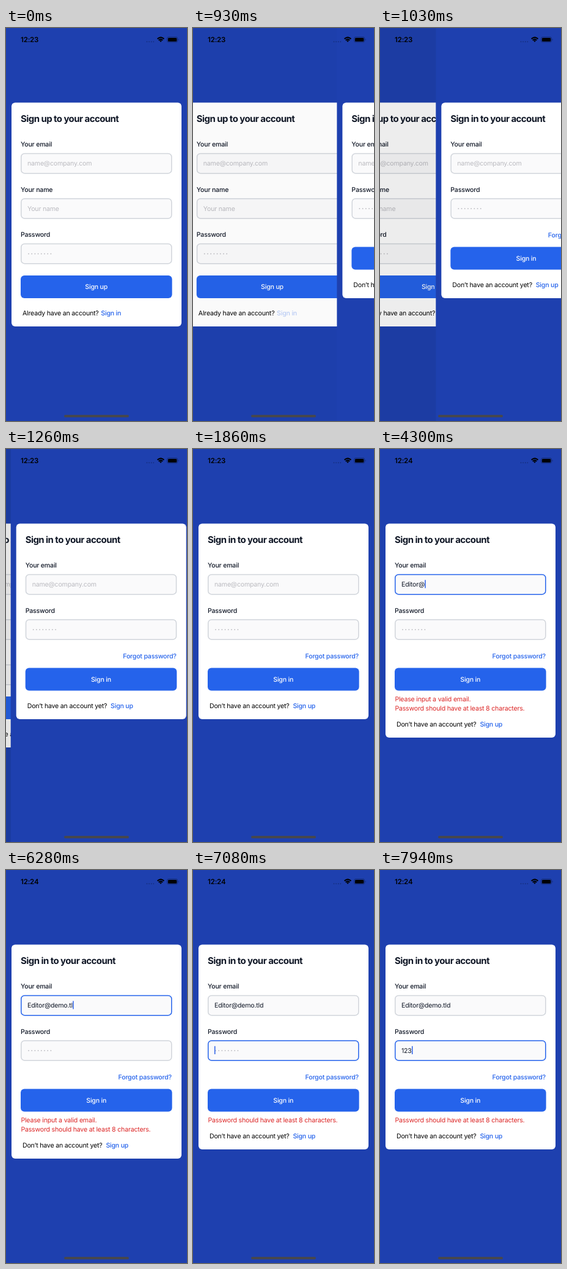
These frames come from a looping animation (296 px wide and 640 px high, 8 s). An HTML page:

```html
<!DOCTYPE html>
<html lang="en">
<head>
<meta charset="utf-8">
<title>Sign in form</title>
<style>
  html, body { margin: 0; width: 100%; height: 100%; overflow: hidden; background: #1e40af; }
  svg { display: block; width: 296px; height: 640px; }
  text { font: 400 10.6px Inter, Roboto, sans-serif; letter-spacing: -.2px; fill: #111827; text-rendering: geometricPrecision; white-space: pre; }
  .title { font-size: 15px; font-weight: 700; letter-spacing: -.57px; }
  .label, .link, .action { font-weight: 500; }
  .link { fill: #2563eb; }
  .action { fill: #fff; text-anchor: middle; }
  .hint { fill: #bbbbc0; }
  .error { fill: #dc2626; }
  .end { text-anchor: end; }
  .plain { fill: #000; }
  .clock { font-size: 11.5px; font-weight: 600; fill: #000; }
</style>
</head>
<body>
<svg viewBox="0 0 296 640">
  <g id="signUp"></g>
  <rect id="shade" width="296" height="640"/>
  <g id="signIn"></g>
  <text id="clock" class="clock" x="24" y="23"></text>
  <g fill="#000" fill-opacity=".3" id="signal"></g>
  <g fill="none" stroke="#000" stroke-width="2">
    <path d="M247.6 17.7Q253 13 258.4 17.7M249.7 20Q253 17.2 256.3 20"/>
    <path d="M251.2 21L253 23L254.8 21Q253 19.7 251.2 21Z" fill="#000" stroke="none"/>
  </g>
  <rect x="263.6" y="14.6" width="17" height="8.6" rx="2.6" fill="none" stroke="#000" stroke-opacity=".4" stroke-width=".8"/>
  <rect x="264.9" y="15.9" width="14.4" height="6" rx="1.5"/>
  <path d="M281.8 17.5Q283.4 18.9 281.8 20.3Z" fill-opacity=".45"/>
  <rect x="95" y="630" width="106" height="4" rx="2" fill="#47474d"/>
</svg>
<script>
const LOOP = 8000;
const EMAIL = "Editor@demo.tld", PASSWORD = "123";
const EMAIL_KEYS = [2910, 3090, 3340, 3600, 3720, 3840, 4300, 5320, 5430, 5650, 5780, 5990, 6140, 6280, 6420];
const PASSWORD_KEYS = [7660, 7770, 7940];
const byId = id => document.getElementById(id);

const text = (x, y, cls, value) => `<text x="${x}" y="${y}" class="${cls}">${value}</text>`;
const dots = (n, x, y, pitch, r) => Array.from({ length: n }, (_, i) =>
  `<circle cx="${x + i * pitch}" cy="${y}" r="${r}"/>`).join("");
const typed = (value, keys, t) => value.slice(0, keys.filter(k => k <= t).length);

function field(y, label, { hint = "", value = "", focus = false, caret = 1 } = {}) {
  const content = value ? text(35, y + 20.3, "value", value)
    : hint ? text(35, y + 20.3, "hint", hint)
    : `<g fill="#bbbbc0">${dots(8, 37, y + 17, 5.2, .9)}</g>`;
  return text(24, y - 10.6, "label", label) +
    `<rect x="24.8" y="${y + .7}" width="246" height="32.3" rx="5.5" fill="#fafafb"
      stroke="${focus ? "#2563eb" : "#d1d5db"}" stroke-width="1.5"/>` + content +
    (focus ? `<rect class="caret" x="35" y="${y + 9.6}" width="1.5" height="13.2" fill="#2e62e8" opacity="${caret}"/>` : "");
}

const page = (bottom, title, body) =>
  `<rect width="296" height="640" fill="#1e40af"/>
   <rect x="9" y="121.5" width="278" height="${bottom - 121.5}" rx="6" fill="#fff"/>` +
  text(24, 152.8, "title", title) + body;

const button = (y, label) =>
  `<rect x="24" y="${y}" width="247.6" height="37" rx="6" fill="#2563eb"/>` + text(147.7, y + 22.2, "action", label);

function signUpPage(pressed) {
  return page(486, "Sign up to your account",
    field(203.7, "Your email", { hint: "name@company.com" }) +
    field(277.2, "Your name", { hint: "Your name" }) +
    field(350.7, "Password") +
    button(403, "Sign up") +
    text(27, 468.2, "plain", "Already have an account?") +
    `<g opacity="${pressed ? .3 : 1}">${text(155.3, 468.2, "link", "Sign in")}</g>`);
}

function signInPage(t) {
  const errors = [];
  if (t >= 3090 && t < 6420) errors.push("Please input a valid email.");
  if (t >= 3090) errors.push("Password should have at least 8 characters.");
  const drop = errors.length * 15;
  const caret = t >= 4850 && t < 4970 ? .5 : t >= 4970 && t < 5210 ? 0 : 1;
  return page(440 + drop, "Sign in to your account",
    field(203.7, "Your email", {
      hint: "name@company.com", value: typed(EMAIL, EMAIL_KEYS, t), focus: t >= 2540 && t < 6970, caret
    }) +
    field(277.2, "Password", { value: typed(PASSWORD, PASSWORD_KEYS, t), focus: t >= 6970 }) +
    text(271, 340.7, "link end", "Forgot password?") +
    button(356.5, "Sign in") +
    errors.map((e, i) => text(24.4, 411.2 + i * 15, "error", e)).join("") +
    text(27, 422.2 + drop, "plain", "Don’t have an account yet?") +
    text(163.4, 422.2 + drop, "link", "Sign up"));
}

// Critically damped push, advancing in 110 ms steps.
function slide(t) {
  if (t >= 1860) return 1;
  const held = Math.min(1360, 810 + Math.floor((t - 810) / 110) * 110);
  const x = Math.max(0, (held - 861) * .0142);
  return 1 - (1 + x) * Math.exp(-x);
}

function update(id, markup) {
  const node = byId(id);
  if (node.markup === markup) return;
  node.innerHTML = node.markup = markup;
  const caret = node.querySelector(".caret");
  if (!caret) return;
  const value = caret.previousElementSibling;
  if (value.matches(".value")) caret.setAttribute("x", 35.3 + value.getComputedTextLength());
}

function render(t) {
  const p = slide(t);
  update("signUp", signUpPage(t >= 810 && t < 1360));
  update("signIn", signInPage(t));
  byId("signUp").setAttribute("transform", `translate(${-88.8 * p})`);
  byId("signIn").setAttribute("transform", `translate(${296 * (1 - p)})`);
  byId("shade").setAttribute("opacity", .1 * p);
  byId("clock").textContent = t < 2540 ? "12:23" : "12:24";
}

byId("signal").innerHTML = dots(4, 230.5, 22.3, 3.6, .9);
const start = performance.now();
function tick() {
  render((performance.now() - start) % LOOP);
  requestAnimationFrame(tick);
}
tick();
</script>
</body>
</html>
```
